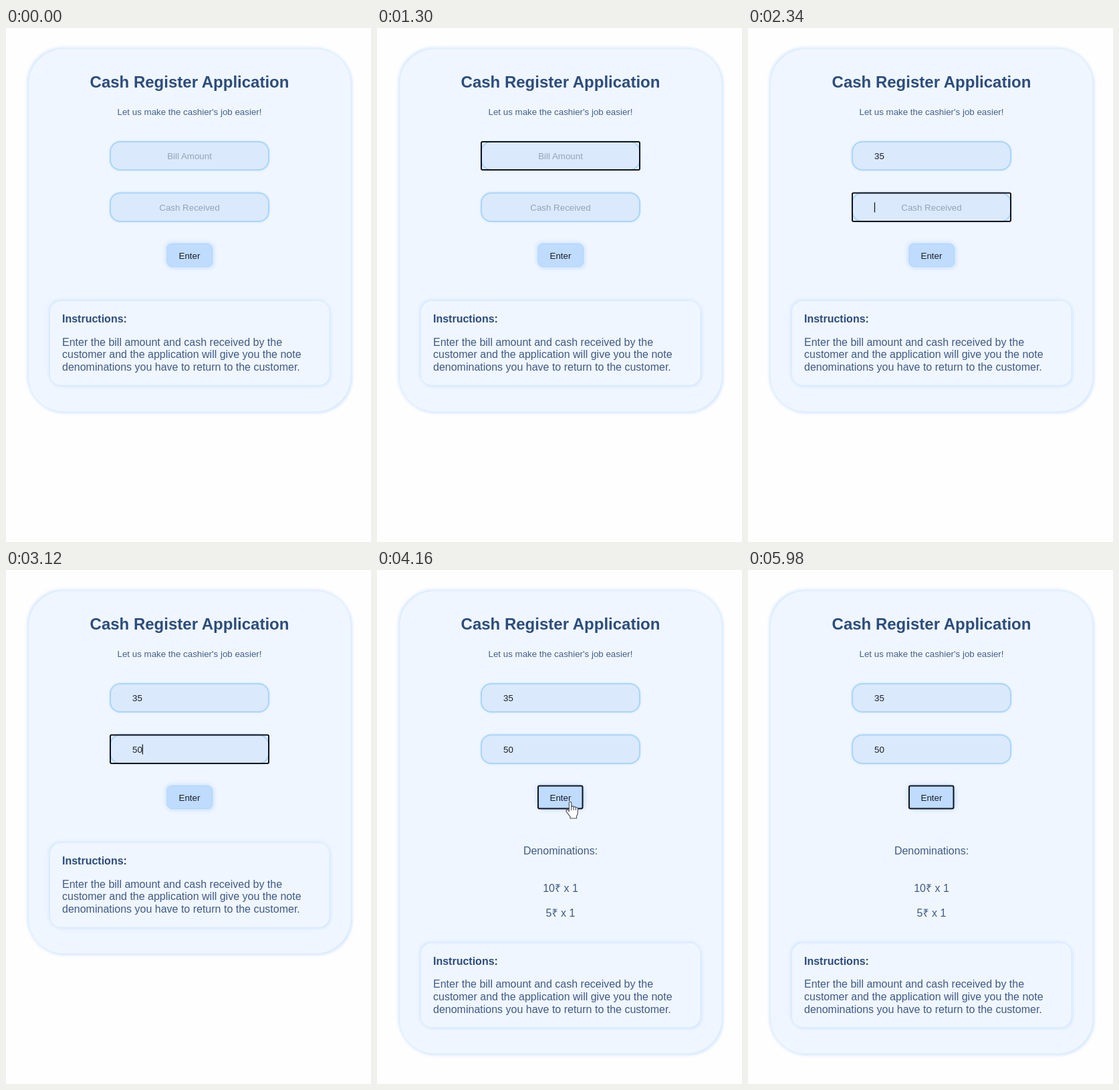
Write an HTML page that moves like this. It is 546 px wide and 768 px high and loops after 6110 ms.

```html
<!DOCTYPE html>
<html lang="en">
<head>
<meta charset="utf-8">
<title>Cash Register</title>
<style>
  html, body { margin: 0; width: 100%; height: 100%; overflow: hidden; background: #fefefe; }
  svg { display: block; width: 546px; height: 768px; }
  text { font: 13.333px "Liberation Sans", Arial, sans-serif; fill: #44608a; text-anchor: middle; }
  .big text { font-size: 16px; fill: #3f5a84; }
  .left text { text-anchor: start; }
  svg .bold { font-weight: bold; fill: #2c4c7c; }
  svg .title { font-size: 24px; }
  svg .hint { fill: #94a3b8; }
  svg .value { fill: #1a1e28; text-anchor: start; }
  .panel { fill: #eff6ff; filter: drop-shadow(2px 2px 2px #d5e7fe) drop-shadow(-2px -2px 2px #d5e7fe); }
  .field { fill: #dbe9fd; stroke: #a9d6fb; stroke-width: 2; filter: drop-shadow(0 0 1.5px #c9e2fd); }
  .button { fill: #bfdbfe; stroke: #a9d6fb; filter: drop-shadow(2px 2px 2.5px #d0e3fd) drop-shadow(-2px -2px 2.5px #d0e3fd); }
  #ring { fill: none; stroke: #10131f; stroke-width: 2; }
  #caret { fill: #111; }
  #arrow, #hand { fill: #fff; stroke: #4a4d55; stroke-width: 1.1; stroke-linejoin: round; }
</style>
</head>
<body>
<svg viewBox="0 0 546 768">
  <rect class="panel" id="card" x="34" y="31.5" width="481.5" height="541.5" rx="52"/>
  <text class="bold title" x="274.5" y="89">Cash Register Application</text>
  <text x="274.5" y="130">Let us make the cashier's job easier!</text>

  <rect class="field" x="156" y="170" width="237" height="42" rx="15"/>
  <rect class="field" x="156" y="246.5" width="237" height="42.5" rx="15"/>
  <text class="hint" id="hint0" x="274.5" y="195.5">Bill Amount</text>
  <text class="hint" id="hint1" x="274.5" y="273">Cash Received</text>
  <text class="value" id="value0" x="189" y="195.5"></text>
  <text class="value" id="value1" x="189" y="273"></text>

  <rect class="button" x="241" y="322.5" width="67.5" height="34" rx="7"/>
  <text class="value" x="258.5" y="345">Enter</text>
  <rect id="ring" rx="2"/>
  <rect id="caret" width="1.2" height="15"/>

  <g class="big" id="result">
    <text x="274.5" y="425">Denominations:</text>
    <text x="274.5" y="481">10₹ x 1</text>
    <text x="274.5" y="518">5₹ x 1</text>
  </g>
  <g class="big left" id="help">
    <rect class="panel" x="66" y="408" width="417.5" height="125.5" rx="16"/>
    <text class="bold" x="84" y="440">Instructions:</text>
    <text x="84" y="474.5">Enter the bill amount and cash received by the</text>
    <text x="84" y="493.2">customer and the application will give you the note</text>
    <text x="84" y="512">denominations you have to return to the customer.</text>
  </g>

  <path id="arrow" d="M.5 .5V16.5L4.3 13L6.8 18.8L9.2 17.8L6.7 12.1H11.8Z"/>
  <path id="hand" d="M-1.6 13V2Q-1.6 .4 0 .4T1.7 2V8Q2 6.8 3.4 6.9T5 8.4Q5.4 7.4 6.7 7.6T8.2 9.4Q8.8 8.5 10 8.8T11.3 10.4V17Q11.3 19.5 9.6 21.5V25H0V22.6L-5.6 15.2Q-6.6 13.2-5.2 12.4T-1.6 14.8ZM1.7 8V13M5 8.6V13M8.2 9.6V13"/>
</svg>
<script>
const LOOP = 6110, STEP = 130, GROW = 149.5;
const $ = id => document.getElementById(id);
const set = (id, attrs) => { for (const k in attrs) $(id).setAttribute(k, attrs[k]); };
const show = (id, on) => { $(id).style.display = on ? "" : "none"; };
const during = (t, a, b) => t >= a && t < b;

// Focus targets: x, y, width, height
const rings = [[156, 170, 237, 42], [156, 246.5, 237, 42.5], [241, 322.5, 66.5, 34]];

// Pointer moves: start, end, hidden from, x0, y0, x1, y1, easing power
const moves = [
  [130, 520, 650, 360, 564, 320, 225, 1],
  [3380, 3770, 3900, 345, 495, 294, 358, 1.6],
  [3900, 3900, 5070, 289, 346, 289, 346, 1],
  [5070, 5460, 5590, 238, 512, 75, 732, 1]
];

function pointer(t) {
  const m = moves.find(m => during(t, m[0], m[2]));
  if (!m) return null;
  const [a, b, , x0, y0, x1, y1, power] = m;
  const p = b > a ? Math.min(1, (t - a) / (b - a)) : 1;
  const e = 1 - (1 - p) ** power;
  return [x0 + (x1 - x0) * e, y0 + (y1 - y0) * e];
}

function draw(t) {
  const values = [[1820, "35"], [2990, "50"]].map(([start, s]) =>
    s.slice(0, Math.max(0, Math.floor((t - start) / STEP) + 1)));
  values.forEach((s, i) => {
    $("value" + i).textContent = s;
    show("hint" + i, !s);
  });

  const focus = t < 780 ? -1 : t < 2210 ? 0 : t < 4030 ? 1 : 2;
  show("ring", focus >= 0);
  if (focus >= 0) {
    const [x, y, width, height] = rings[focus];
    set("ring", { x, y, width, height });
  }
  const caret = during(t, 780, 1300) || during(t, 1820, 2210) || during(t, 2340, 4030);
  show("caret", caret);
  if (caret) set("caret", { x: 188.9 + 7.415 * values[focus].length, y: focus ? 260.5 : 183.5 });

  const done = t >= 4160;
  show("result", done);
  set("card", { height: 541.5 + (done ? GROW : 0) });
  set("help", { transform: `translate(0 ${done ? GROW : 0})` });

  const at = pointer(t), linked = during(t, 3770, 5070);
  show("arrow", at && !linked);
  show("hand", at && linked);
  if (at) set(linked ? "hand" : "arrow", { transform: `translate(${at})` });
}

const origin = performance.now();
function tick() {
  const t = (performance.now() - origin) % LOOP;
  draw(Math.floor(t / STEP) * STEP);
  requestAnimationFrame(tick);
}
tick();
</script>
</body>
</html>
```
